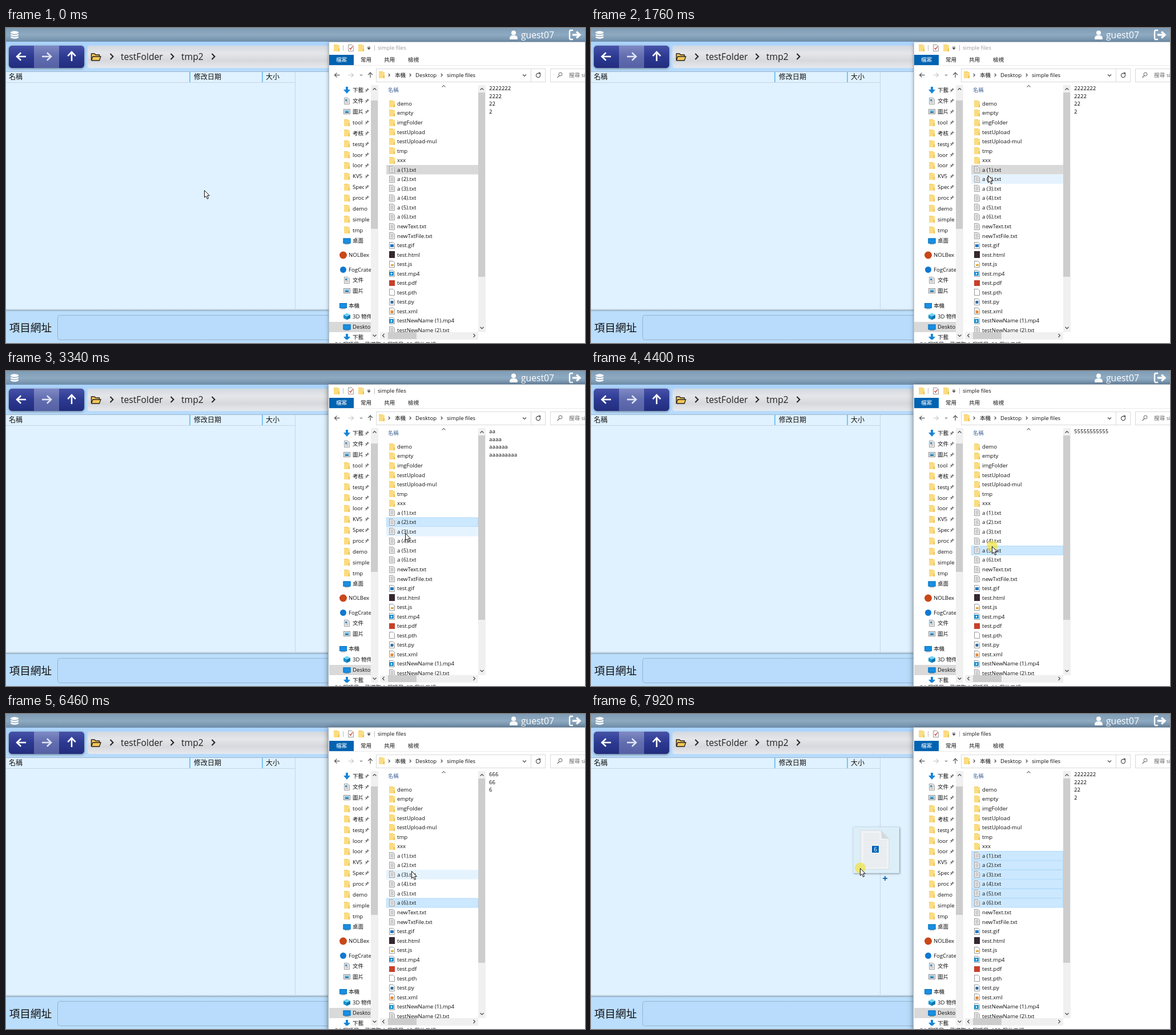
Animation, 1014 px wide and 552 px high, one loop 7990 ms. Source, as an HTML page with a canvas:

```html
<!DOCTYPE html>
<html lang="zh-Hant">
<head>
<meta charset="utf-8">
<style>
html, body { margin: 0; width: 100%; height: 100%; overflow: hidden; background: #e0f2ff; }
canvas { display: block; }
</style>
</head>
<body>
<canvas id="stage" width="1014" height="552"></canvas>
<script>
const ctx = document.getElementById('stage').getContext('2d');
const LOOP = 7990, ROW = 16.54;
const SANS = '"Open Sans", "Noto Sans CJK TC", "Noto Sans CJK", sans-serif';
const MONO = '"Noto Sans Mono", monospace';

// start, end, steps, x, y
const moves = [
  [790, 1140, 6, 674, 191], [1210, 1340, 3, 688, 152], [1410, 1550, 3, 691, 229],
  [1620, 1760, 3, 695, 258], [1890, 1960, 2, 696, 258], [2600, 2670, 2, 697, 266],
  [3200, 3340, 3, 699, 284], [4120, 4190, 2, 702, 307], [4790, 4860, 2, 701, 300],
  [5140, 5270, 3, 702, 319], [5400, 5470, 2, 702, 330], [6370, 6460, 2, 710, 275],
  [6520, 6790, 5, 709, 247], [7780, 7920, 3, 471, 270]
];
const presses = [[2290, 2540], [3600, 3660], [4400, 4460], [4930, 5000], [5600, 5740], [6990, 7120], [7260, LOOP]];
const twos = ['2222222', '2222', '22', '2'];
// time, first and last selected file, preview, bytes
const selections = [
  [0, 1, 1, twos, 20], [2350, 2, 2, ['aa', 'aaaa', 'aaaaaa', 'aaaaaaaaa'], 27],
  [3600, 3, 3, ['333', '33'], 7], [4400, 5, 5, ['5'.repeat(11)], 11],
  [4930, 4, 4, ['44444444'], 8], [5600, 6, 6, ['666', '66', '6'], 10], [6990, 1, 6, twos, 133]
];
const files = ['demo', 'empty', 'imgFolder', 'testUpload', 'testUpload-mul', 'tmp', 'xxx',
  ...[1, 2, 3, 4, 5, 6].map(n => `a (${n}).txt`), 'newText.txt', 'newTxtFile.txt',
  'test.gif', 'test.html', 'test.js', 'test.mp4', 'test.pdf', 'test.pth', 'test.py', 'test.xml',
  'testNewName (1).mp4', 'testNewName (2).txt'];
const pinned = ['下載', '文件', '圖片', 'tool', '考核', 'testg', 'loor', 'loor', 'KV5', 'Spec', 'proc', 'demo', 'simple', 'tmp', '桌面'];
// label, y, level, icon
const tree = [['NOLBex', 398, 0, 'red'], ['FogCrate', 423.5, 0, 'blue'], ['文件', 442, 1, 'doc'], ['圖片', 461, 1, 'image'],
  ['本機', 486.5, 0, 'screen'], ['3D 物件', 505.5, 1, 'cube'], ['Desktop', 524, 1, 'screen'], ['下載', 542, 1, 'down']];

function rect(x, y, w, h, fill, stroke) {
  if (fill) { ctx.fillStyle = fill; ctx.fillRect(x, y, w, h); }
  if (stroke) { ctx.strokeStyle = stroke; ctx.lineWidth = 1; ctx.strokeRect(x + .5, y + .5, w - 1, h - 1); }
}
function text(s, x, y, size = 9.6, color = '#111', family = SANS) {
  ctx.font = `${size}px ${family}`;
  ctx.fillStyle = color;
  ctx.fillText(s, x, y + size * .36);
}
function trace(points) {
  ctx.beginPath();
  for (let i = 0; i < points.length; i += 2) ctx.lineTo(points[i], points[i + 1]);
}
function line(points, color = '#444', width = 1) {
  trace(points);
  ctx.strokeStyle = color; ctx.lineWidth = width;
  ctx.stroke();
}
function poly(points, color) { trace(points); ctx.fillStyle = color; ctx.fill(); }
function disc(x, y, r, color, ry = r) {
  ctx.beginPath(); ctx.ellipse(x, y, r, ry, 0, 0, 7);
  ctx.fillStyle = color; ctx.fill();
}
function rounded(x, y, w, h, r, fill, stroke) {
  ctx.beginPath(); ctx.roundRect(x, y, w, h, r);
  if (fill) { ctx.fillStyle = fill; ctx.fill(); }
  if (stroke) { ctx.strokeStyle = stroke; ctx.lineWidth = 1; ctx.stroke(); }
}
function gradient(y0, y1, ...colors) {
  const g = ctx.createLinearGradient(0, y0, 0, y1);
  colors.forEach((c, i) => g.addColorStop(i / (colors.length - 1), c));
  return g;
}
function clipped(x, y, w, h, draw) {
  ctx.save(); ctx.beginPath(); ctx.rect(x, y, w, h); ctx.clip();
  draw(); ctx.restore();
}
// dir: 0 right, 1 down, 2 left, 3 up
function turned(x, y, dir, draw) {
  ctx.save(); ctx.translate(x, y); ctx.rotate(dir * Math.PI / 2); draw(); ctx.restore();
}
const chevron = (x, y, dir, r = 2.5, color = '#444', width = 1.1) =>
  turned(x, y, dir, () => line([-r / 2, -r, r / 2, 0, -r / 2, r], color, width));
const arrow = (x, y, dir, r, color, width) => turned(x, y, dir, () => {
  line([-r, 0, r, 0], color, width);
  line([r * .1, -r * .85, r, 0, r * .1, r * .85], color, width);
});

function folder(x, y) {
  rect(x - 5, y - 6, 7, 12, '#f3cd62');
  rect(x - 5, y - 5, 10, 11, '#fbdc82');
  rect(x + 3, y + 1, 2, 5, '#eebf4c');
}
function page(x, y, lines) {
  rect(x - 4.5, y - 6, 9, 12, '#fdfdfd');
  line([x - 4.5, y - 5.5, x + 2, y - 5.5, x + 4.5, y - 3, x + 4.5, y + 5.5, x - 4.5, y + 5.5, x - 4.5, y - 6], '#999');
  if (lines) for (let i = -3; i < 5; i += 2) line([x - 3, y + i, x + 3, y + i], '#9a9a9a', .9);
}
const icons = {
  folder, txt: (x, y) => page(x, y, true), pth: page,
  gif(x, y) { page(x, y); rect(x - 3, y - 2, 6, 5, '#2878c4'); },
  html(x, y) { rect(x - 5, y - 6, 10, 12, '#35272f'); },
  js(x, y) { page(x, y); rect(x - 2, y, 5, 3, '#dca637'); },
  mp4(x, y) { page(x, y); rect(x - 5, y - 3, 8, 7, '#178ed0'); poly([x - 2, y - 1.5, x + 1, y + .5, x - 2, y + 2.5], '#fff'); },
  pdf(x, y) { rect(x - 5, y - 5, 10, 10, '#c8402b'); },
  py(x, y) { page(x, y); rect(x - 2.5, y - 2, 5, 5, '#356f9f'); },
  xml(x, y) { page(x, y); rect(x - 2.5, y - 1, 5, 5, '#e58b37'); },
  red(x, y) { disc(x, y, 6.5, '#c94718'); },
  blue(x, y) { disc(x, y, 5.5, '#0f78d0'); },
  doc(x, y) { page(x, y, true); rect(x - 3, y - 3, 3, 3, '#328bc4'); },
  image(x, y) { rect(x - 6, y - 5, 12, 9, '#fff', '#888'); rect(x - 4, y - 3, 8, 5, '#70b9df'); poly([x - 4, y + 2, x, y - 1, x + 4, y + 2], '#356988'); },
  screen(x, y) { rect(x - 6.5, y - 4.5, 13, 9, '#168fe5', '#0870b7'); rect(x - 4, y + 5, 8, 1, '#5b8298'); },
  cube(x, y) {
    poly([x - 6, y - 3, x, y - 6, x + 6, y - 3, x, y], '#70d4f5');
    poly([x - 6, y - 3, x, y, x, y + 6, x - 6, y + 3], '#1593cc');
    poly([x + 6, y - 3, x, y, x, y + 6, x + 6, y + 3], '#0775ac');
  },
  down(x, y) { rect(x - 2, y - 6, 4, 6, '#1686d9'); poly([x - 6, y - 1, x + 6, y - 1, x, y + 6], '#1686d9'); }
};

function webApp() {
  rect(0, 0, 1014, 552, '#e0f2ff');
  rect(0, 0, 1014, 24, gradient(0, 24, '#7f9cb6', '#8eaac1', '#6f8da9'));
  for (const y of [16, 12, 8]) {
    disc(15, y + 1, 7, '#7f9cb6', 3);
    rect(8, y - 1, 14, 2, '#fff');
    disc(15, y, 7, '#fff', 2.8);
  }
  disc(889, 8.5, 4, '#fff');
  rounded(882, 13, 14, 7, [5, 5, 1, 1], '#fff');
  text('guest07', 902, 12.5, 15.7, '#fff');
  line([993, 4, 988, 4, 987, 6, 987, 18, 988, 20, 993, 20], '#fff', 2.4);
  arrow(998.5, 12, 0, 6.5, '#fff', 3.4);

  rect(0, 24, 1014, 53, gradient(24, 77, '#a9d2fb', '#bddffe', '#b6dafb'));
  rect(0, 76, 1014, 1, '#a0b9cf');
  ctx.save();
  ctx.shadowColor = '#0007'; ctx.shadowBlur = 4; ctx.shadowOffsetY = 1;
  rounded(5, 31, 132, 39, 6, '#2d3b92');
  ctx.restore();
  rounded(5, 31, 132, 39, 6, gradient(31, 70, '#4752a8', '#2c3991', '#222d7d'));
  rect(49, 31, 44, 39, gradient(31, 70, '#7f89c4', '#606dae', '#5661a5'));
  arrow(27, 50, 2, 8, '#fff', 2.6);
  arrow(71, 50, 0, 8, '#dfe3f5', 2.6);
  arrow(115, 50, 3, 8, '#fff', 2.6);
  rounded(143, 31, 460, 39, 4, gradient(31, 70, '#d4d9df', '#e4e6e9', '#d6d8dc', '#e6e9ed'));
  const flap = [149.5, 57, 152, 50, 166, 50, 163.5, 57, 149.5, 57];
  const back = [149.5, 57, 149.5, 45, 155, 45, 157, 47, 163.5, 47, 163.5, 50];
  poly(back, '#f8c756');
  line(back, '#222', 1.4);
  poly(flap, '#f8c756');
  line(flap, '#222', 1.3);
  for (const x of [185, 291, 363]) chevron(x, 50, 0, 5, '#222', 2);
  text('testFolder', 201, 50.5, 15.7, '#222');
  text('tmp2', 307, 50.5, 15.7, '#222');

  text('名稱', 5, 86, 12);
  text('修改日期', 329, 86, 12);
  text('大小', 455, 86, 12);
  rect(321, 77, 2, 18, '#79c5ef');
  rect(448, 77, 2, 18, '#79c5ef');
  rect(0, 95, 506, 1, '#c9d5dd');
  rect(506, 77, 1, 418, '#c5d6e2');
  rect(0, 492, 1014, 4, gradient(492, 496, '#d8eaf7', '#91a9bd'));
  rect(0, 496, 1014, 56, '#bbdefd');
  text('項目網址', 5.5, 525, 18.7);
  rounded(90.5, 503.5, 520, 43, 4, '#b9dcfc', '#93b4d0');
}

function explorerFrame(active) {
  const edge = active ? 564 : 565, top = active ? 23 : 24;
  ctx.save();
  ctx.shadowColor = active ? '#0007' : '#0005'; ctx.shadowBlur = active ? 9 : 6; ctx.shadowOffsetY = 2;
  rect(edge, top, 470, 560, '#fff');
  ctx.restore();
  rect(edge, top, 470, 560, '#fff', active ? '#a3b1bc' : '#b3bec6');
  folder(579, 35);
  rect(590, 30, 1, 10, '#bbb');
  page(604, 35);
  line([601.5, 35, 603.5, 37.5, 607, 32], '#d03b29', 1.3);
  folder(622, 35);
  rect(633, 33, 5, 1, '#333');
  poly([632.5, 35, 638.5, 35, 635.5, 38], '#333');
  rect(645, 30, 1, 10, '#bbb');
  text('simple files', 651, 35, 9.5, active ? '#111' : '#999');
  rect(566, 47, 43, 18, '#0063b1');
  text('檔案', 578, 56, 9.6, '#fff');
  text('常用', 621, 56);
  text('共用', 662, 56);
  text('檢視', 704, 56);
  rect(566, 65, 448, 1, '#e9eaeb');
  arrow(580, 82.5, 2, 4.5, '#444', 1.1);
  arrow(604, 82.5, 0, 4.5, '#c5c5c5', 1.1);
  chevron(622, 82.5, 1, 2, '#888');
  arrow(638, 82.5, 3, 4.5, '#444', 1.1);
  rect(648, 71, 297, 24, '#fff', '#d9d9d9');
  rect(919, 71, 1, 24, '#d9d9d9');
  folder(658, 82);
  for (const x of [671, 708, 763]) chevron(x, 82.5, 0);
  text('本機', 681, 82.5);
  text('Desktop', 717, 82.5);
  text('simple files', 772, 82.5);
  chevron(908, 83, 1, 3);
  ctx.beginPath(); ctx.arc(932, 83, 3.6, -.6, 5);
  ctx.strokeStyle = '#444'; ctx.lineWidth = 1.1; ctx.stroke();
  poly([932, 78, 936, 78, 936, 82], '#444');
  rect(953, 71, 80, 24, '#fff', '#d9d9d9');
  ctx.beginPath(); ctx.arc(971, 81, 3, 0, 7);
  ctx.strokeStyle = '#666'; ctx.stroke();
  line([969, 83.5, 965.5, 87], '#666', 1.1);
  text('搜尋 simple files', 986, 82.5, 9.6, '#666');
}

function scrollbars() {
  rect(639, 100, 13, 446, '#f0f0f0');
  rect(639, 127, 12, 225, '#cdcdcd');
  chevron(645.5, 107, 3, 3); chevron(645.5, 539, 1, 3);
  rect(827, 100, 13, 433, '#f0f0f0');
  rect(827, 113, 12, 323, '#cdcdcd');
  chevron(833.5, 107, 3, 3); chevron(833.5, 525.5, 1, 3);
  rect(655, 533, 172, 13, '#f0f0f0');
  rect(669, 533, 50, 12, '#cdcdcd');
  chevron(661, 539, 2, 3); chevron(820, 539, 0, 3);
}

function navigation(t) {
  rect(566, 515, 73, 18, '#d9d9d9');
  const expander = Math.max(0, Math.min(1, (t - 1000) / 100, (1600 - t) / 250));
  clipped(566, 98, 73, 448, () => {
    pinned.forEach((label, i) => {
      const y = 109 + i * 18.85;
      const icon = { 0: 'down', 1: 'doc', 2: 'image', 14: 'screen' }[i] || 'folder';
      icons[icon](597, Math.round(y));
      clipped(605, y - 9, i < 11 ? 22 : 34, 18, () => text(label, 607, y));
      if (i < 11) {
        line([629, y + 3.5, 631.5, y + 1], '#777');
        poly([629, y - 1, 632, y - 1, 633, y - 4, 636, y - 1, 633, y, 632, y + 3], '#777');
      }
    });
    for (const [label, y, level, icon] of tree) {
      icons[icon](590.5 + level * 6.5, y);
      text(label, 600 + level * 7, y);
      ctx.globalAlpha = expander;
      const open = y === 423.5 || y === 486.5;
      chevron(573.5 + level * 6.5, y, open ? 1 : 0, 2.5, '#aaa');
      ctx.globalAlpha = 1;
    }
  });
}

function fileList(t, cursor, active, [, first, last]) {
  text('名稱', 669, 109, 9.3, '#3f6399');
  chevron(766.5, 102, 3, 3, '#777');
  const over = cursor.x > 666 && cursor.x < 827 ? Math.floor((cursor.y - 124.2) / ROW) : -1;
  clipped(655, 118, 172, 415, () => files.forEach((name, i) => {
    const y = 132.5 + i * ROW, top = y - ROW / 2;
    if (i >= first + 6 && i <= last + 6) {
      if (active) rect(666, top, 161, ROW, '#cce8ff', '#b4dcfa');
      else rect(666, top, 161, ROW, '#d9d9d9');
    } else if (i === over) rect(666, top, 161, ROW, '#e5f3ff');
    icons[i < 7 ? 'folder' : name.split('.')[1]](676, Math.round(y));
    text(name, 685, y);
  }));
}

function pointer({ x, y }) {
  const shape = [0, 0, 0, 12.5, 2.8, 10, 5, 15, 7, 14, 5, 9.2, 8.8, 9.2, 0, 0];
  const points = shape.map((v, i) => v + (i % 2 ? y : x) + .5);
  poly(points, '#fff');
  line(points, '#111', 1);
}

function dragImage({ x, y }) {
  ctx.save();
  ctx.translate(x - 471, y - 270);
  ctx.shadowColor = '#0006'; ctx.shadowBlur = 3; ctx.shadowOffsetX = ctx.shadowOffsetY = 1;
  rect(459, 198, 81, 81, '#dceff9');
  ctx.shadowColor = 'transparent';
  rect(459, 198, 81, 81, '#dceff9', '#d0e6f1');
  const sheet = [472, 204, 508, 204, 522, 219, 522, 272, 472, 272, 472, 204];
  poly(sheet, '#eff3f5');
  line(sheet, '#d3dade');
  for (let ly = 210; ly < 269; ly += 3) line([477, ly, ly < 222 ? 505 : 518, ly], '#d9dee1', .8);
  poly([508, 204, 509, 218, 522, 219], '#d3dadd');
  rect(491, 230, 14, 14, '#0063b8', '#fff');
  text('6', 495.2, 237, 10, '#fff');
  line([511, 288, 519, 288], '#0862b5', 1.8);
  line([515, 284, 515, 292], '#0862b5', 1.8);
  ctx.restore();
}

function cursorAt(t) {
  let x = 347, y = 284;
  for (const [start, end, steps, toX, toY] of moves) {
    if (t < start) break;
    const done = Math.floor((t - start) / (end - start) * (steps - 1) + 1e-6) + 1;
    const k = Math.min(1, done / steps);
    x += (toX - x) * k;
    y += (toY - y) * k;
  }
  return { x: Math.round(x), y: Math.round(y) };
}

function draw(t) {
  const cursor = cursorAt(t), active = t >= 2290;
  const selection = selections.findLast(s => t >= s[0]);
  const [, first, last, preview, bytes] = selection;
  webApp();
  explorerFrame(active);
  navigation(t);
  fileList(t, cursor, active && t >= 2350, selection);
  scrollbars();
  preview.forEach((s, i) => text(s, 846, 106 + i * 13.5, 9.15, '#111', MONO));
  text(`34 個項目    已選取 ${last - first + 1} 個項目  ${bytes} 個位元組`, 576, 555);
  if (t >= 7780) dragImage(cursor);
  if (presses.some(([from, to]) => t >= from && t < to)) disc(cursor.x + .5, cursor.y - .3, 9.5, '#f0e23cb3');
  if (t < 7450 || t >= 7580) pointer(cursor);
}

const begin = performance.now();
function tick() {
  draw((performance.now() - begin) % LOOP);
  requestAnimationFrame(tick);
}
tick();
</script>
</body>
</html>
```
